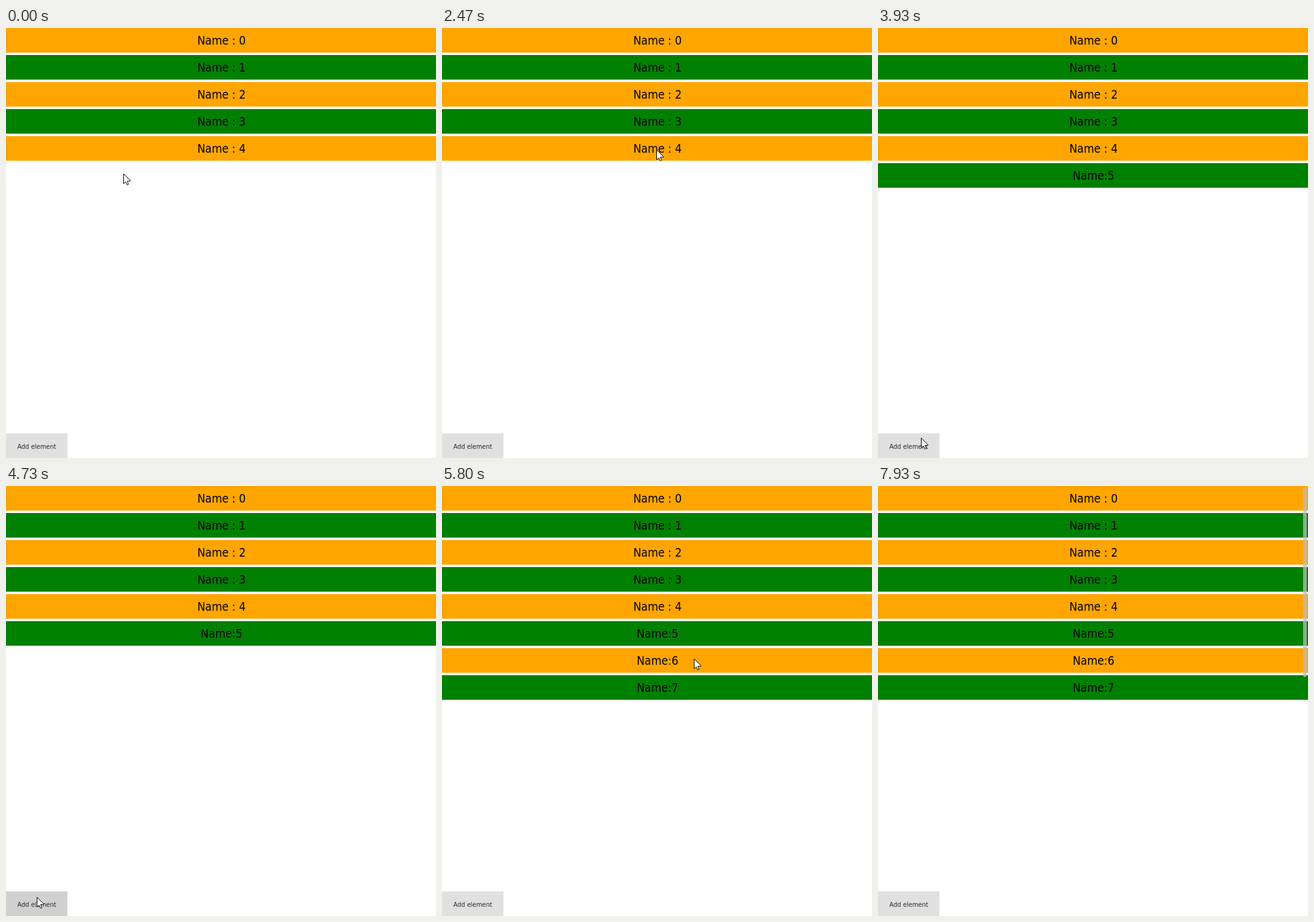
Write an HTML page that moves like this. It is 700 px wide and 700 px high and loops after 8 s.

```html
<!DOCTYPE html>
<html lang="en">
<head>
<meta charset="utf-8">
<title>Growing list</title>
<style>
  html, body { margin: 0; width: 100%; height: 100%; overflow: hidden; background: #fff; }
  svg { display: block; }
  text { font-family: "DejaVu Sans Condensed", "Noto Sans", sans-serif; text-anchor: middle; }
</style>
</head>
<body>
<svg width="700" height="700">
  <svg id="list" height="350" font-size="19.2"></svg>
  <rect id="button" y="660" width="100" height="40"/>
  <text x="50" y="685" font-size="11" fill="#26282a">Add element</text>
  <rect id="bar" x="692" y="2" width="6" rx="3" fill="#bdbdbd" opacity=".75"/>
  <path id="cursor" d="M.5.5V16.5L3.8 13.3 6.3 18.5 8.5 17.6 6.4 12.3H11.5V11.5Z" fill="#fff" stroke="#000"/>
</svg>
<script>
const LOOP = 8000, FPS = 15;
const PITCH = 44, START_ROWS = 5, VIEW = 350;
const $ = id => document.getElementById(id);

// Times are in ticks of 1/15 s.
const clicks = [[57, 59], [71, 73], [79, 82], [107, 110]];
const offStage = tick => tick > 3 && tick < 9 || tick > 118;

// The pointer rests between glides: from tick, to tick, x, y.
const home = [191, 237];
const glides = [
  [0, 3, 123, 31], [4, 8, 73, 62],
  [8, 22, 88, 584], [22, 34, 70, 680],
  [34, 40, 389, 129], [44, 58, 70, 667], [62, 70, 50, 669],
  [83, 87, 410, 281], [87, 91, 454, 187], [96, 97, 451, 176],
  [99, 106, 52, 668], [111, 118, 640, 160]
];

const easeOut = f => 1 - (1 - f) ** 3;

function pointerAt(tick) {
  let [x, y] = home;
  for (const [from, to, toX, toY] of glides) {
    if (tick <= from) break;
    const f = easeOut(Math.min(1, (tick - from) / (to - from)));
    x += (toX - x) * f;
    y += (toY - y) * f;
  }
  return [Math.round(x), Math.round(y)];
}

const rowCount = START_ROWS + clicks.length;
$("list").innerHTML = Array.from({ length: rowCount }, (_, i) => `<g transform="translate(0 ${i * PITCH})">
  <rect width="700" height="40" fill="${i % 2 ? "#008000" : "#ffa500"}"/>
  <text x="350.8" y="27">Name${i < START_ROWS ? " : " : ":"}${i}</text></g>`).join("");
$("bar").setAttribute("height", (VIEW - 4) * VIEW / (rowCount * PITCH - 4));

const show = (el, on) => el.setAttribute("visibility", on ? "visible" : "hidden");

function draw(time) {
  // Clock in 10 ms steps, with each tick rounded to the nearest step.
  const tick = Math.floor((Math.floor(time % LOOP / 10) * 10 + 3.4) * FPS / 1000);
  const added = clicks.filter(([, up]) => tick >= up).length;
  [...$("list").children].forEach((row, i) => show(row, i < START_ROWS + added));
  const pressed = clicks.some(([down, up]) => tick >= down && tick < up);
  $("button").setAttribute("fill", pressed ? "#d0d0d0" : "#e0e0e0");
  show($("bar"), tick > 118);
  show($("cursor"), !offStage(tick));
  $("cursor").setAttribute("transform", `translate(${pointerAt(tick)})`);
}

let start;
function loop(now) {
  start ??= now;
  draw(now - start);
  requestAnimationFrame(loop);
}
draw(0);
requestAnimationFrame(loop);
</script>
</body>
</html>
```
